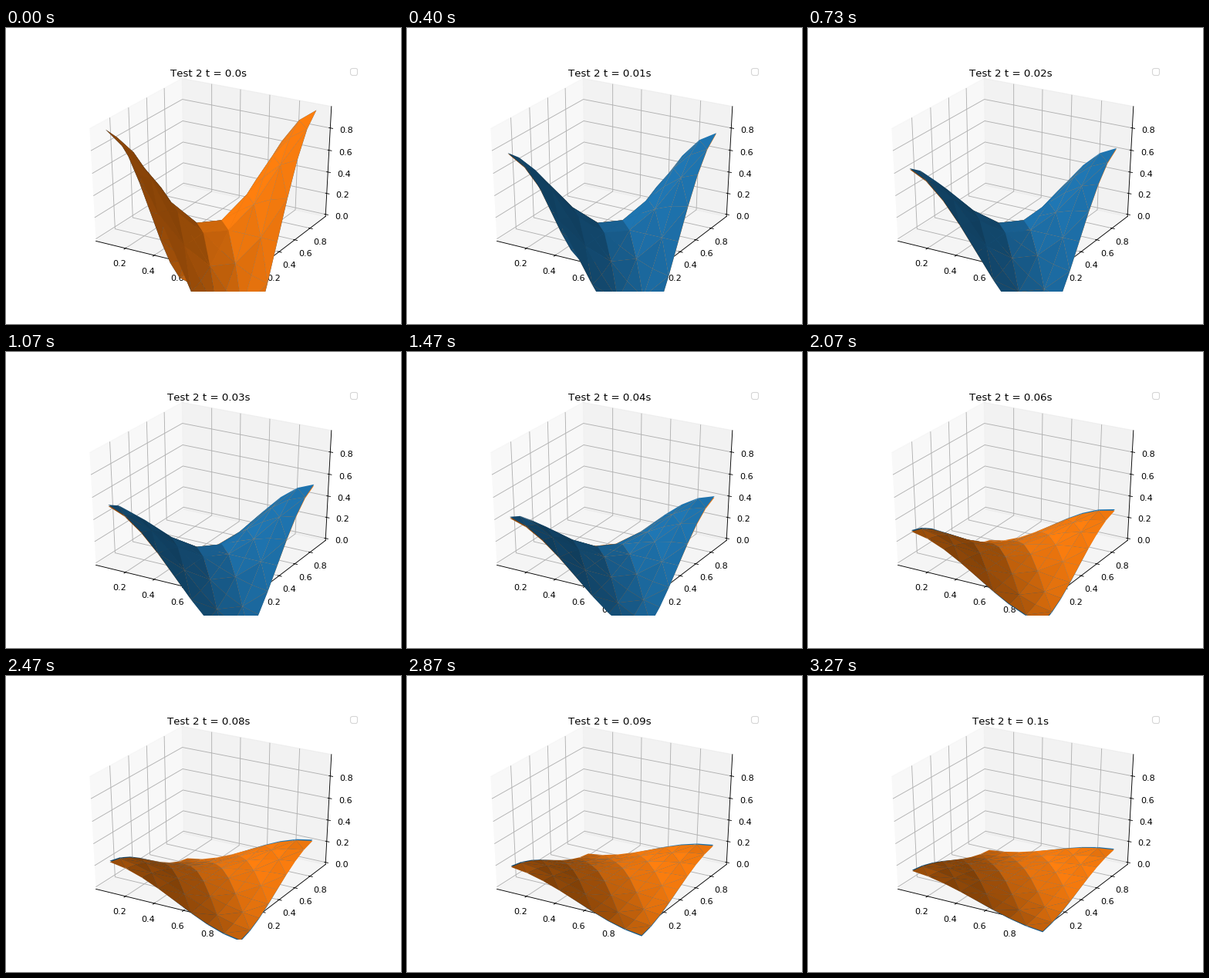
Write a matplotlib script that moves like this. It is 512 px wide and 384 px high and loops after 3340 ms.

```python
import numpy as np
import matplotlib.pyplot as plt
from matplotlib.animation import FuncAnimation
from matplotlib.tri import Triangulation
from mpl_toolkits.mplot3d.art3d import Poly3DCollection

LOOP_MS = 3340
TICK_MS = 20
STEPS_PER_SECOND = 15
LAST_STEP = 49
T_END = 0.1
EXACT_RATE = 2 * np.pi ** 2
NUMERIC_RATE = 19.05
CELLS = 9
BLUE = np.array([0x1f, 0x77, 0xb4]) / 255
ORANGE = np.array([0xff, 0x7f, 0x0e]) / 255
LIGHT = np.array([-1, -1, 0.5])

plt.rcParams["font.family"] = "DejaVu Sans"
plt.rcParams["text.kerning_factor"] = 6

# One value per cell centre of the unit square
centres = (np.arange(CELLS) + 0.5) / CELLS
x, y = (a.ravel() for a in np.meshgrid(centres, centres))
mode = np.cos(np.pi * x) * np.cos(np.pi * y)
faces = Triangulation(x, y).triangles


def surface(amplitude):
    return np.column_stack([x, y, amplitude * mode])[faces]


def shaded(triangles, color):
    """Scale the colour from half to full brightness over the range of light."""
    a, b, c = triangles.transpose(1, 0, 2)
    normals = np.cross(b - a, c - b)
    light = normals @ LIGHT / np.linalg.norm(normals, axis=1)
    level = (light - light.min()) / np.ptp(light)
    return (0.5 + 0.5 * level)[:, None] * color


def padded(low, high, share):
    margin = (high - low) * share
    return low - margin, high + margin


fig = plt.figure(figsize=(6.4, 4.8), dpi=80, facecolor="white")
ax = fig.add_subplot(projection="3d")
ax.apply_aspect = lambda position=None: None  # keep the wide axes box
ax.set_box_aspect((1, 1, 1), zoom=0.94676)
ax.view_init(elev=30, azim=-60)

sheets = []
for sheet_color, rate in ((BLUE, NUMERIC_RATE), (ORANGE, EXACT_RATE)):
    sheet = Poly3DCollection(surface(1), facecolors=shaded(surface(1), sheet_color))
    ax.add_collection3d(sheet)
    sheets.append((sheet, sheet_color, rate))

# Data limits with a 5 % margin, then the small gap between limits and panes
data_limits = padded(centres[0], centres[-1], 0.05)
ax.set_xlim(*padded(*data_limits, 1 / 48))
ax.set_ylim(*padded(*data_limits, 1 / 48))
ax.set_zlim(*padded(0, mode.max(), 1 / 48))
ticks = [0.2, 0.4, 0.6, 0.8]
ax.set_xticks(ticks)
ax.set_yticks(ticks)
ax.set_zticks([0.0] + ticks)

ax.legend([], [])
title = ax.set_title("", y=1)
title.set_y(0.92)


def draw(frame):
    seconds = (frame + 0.75) * TICK_MS / 1000
    step = min(int(seconds * STEPS_PER_SECOND), LAST_STEP)
    t = T_END * step / LAST_STEP
    title.set_text(f"Test 2 t = {round(t, 2)}s")
    for sheet, color, rate in sheets:
        triangles = surface(np.exp(-rate * t))
        sheet.set_verts(triangles)
        sheet.set_facecolor(shaded(triangles, color))
    return [title] + [sheet for sheet, _, _ in sheets]


anim = FuncAnimation(fig, draw, frames=LOOP_MS // TICK_MS, interval=TICK_MS,
                     repeat=True, repeat_delay=0, blit=False)
plt.show()
```
